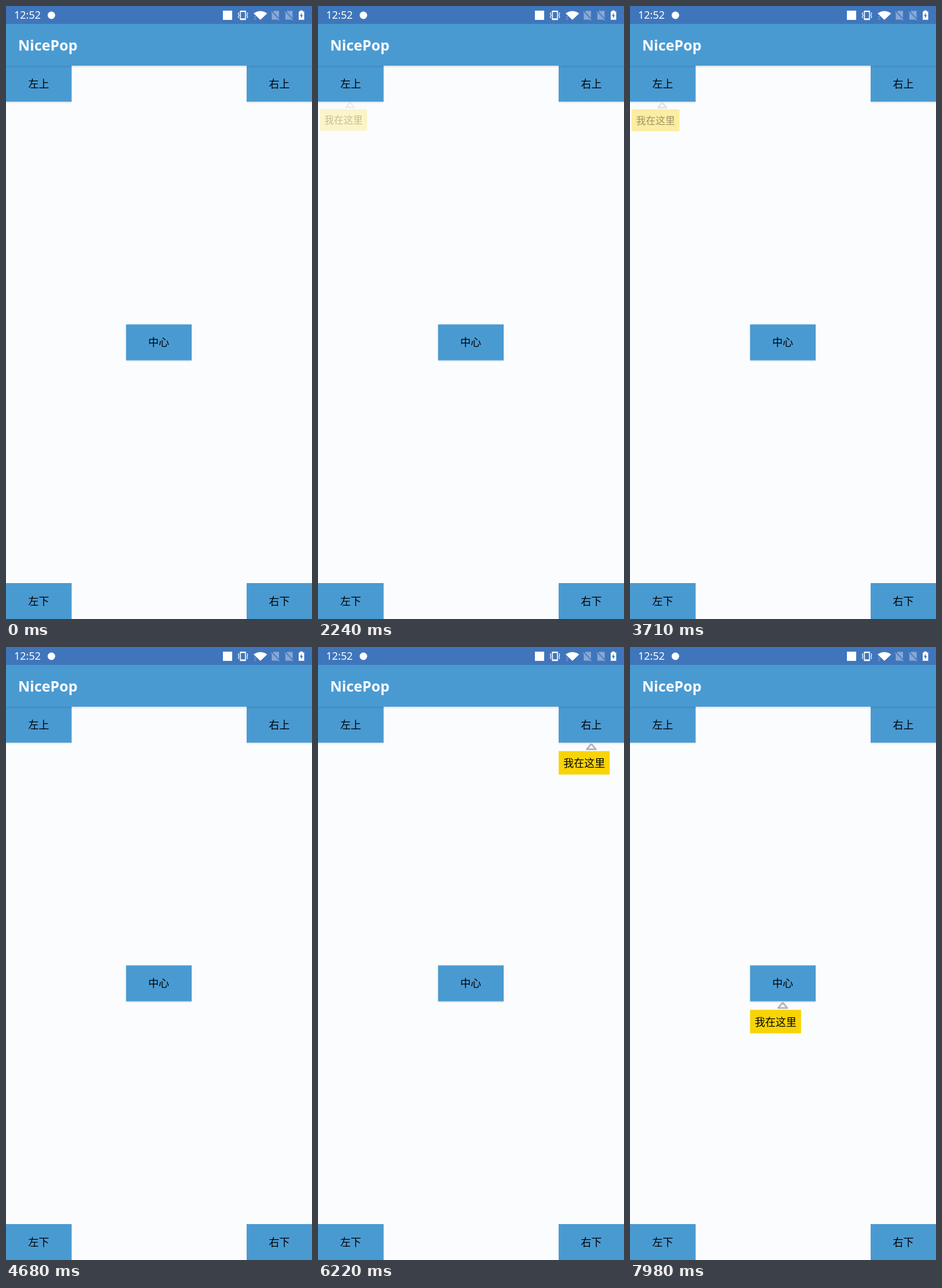
Recreate the animation shown at these times as an HTML page with a canvas. Size 529x1058 px, loop 8 s.

```html
<!DOCTYPE html>
<html lang="zh-CN">
<head>
<meta charset="utf-8">
<title>NicePop</title>
<style>
html, body { margin: 0; width: 100%; height: 100%; overflow: hidden; background: #fbfcfe; }
canvas { display: block; }
</style>
</head>
<body>
<canvas id="stage" width="529" height="1058"></canvas>
<script>
const ctx = document.getElementById('stage').getContext('2d');
const W = 529, H = 1058, LOOP = 8000, SHOW = 640, HIDE = 620;
const LATIN = '"Noto Sans", "Open Sans", sans-serif';
const CJK = '"Noto Sans CJK SC", "Noto Sans CJK", "Noto Sans", sans-serif';
const BLUE = '#4a9ad2', BAR = '#3f76bb', FADED = '#86a9d8';

const buttons = [
  ['左上', 0, 103], ['右上', 416, 103], ['中心', 207.5, 549.5],
  ['左下', 0, 996], ['右下', 416, 996]
];
const popups = [
  { x: 0, y: 165, show: 1940, hide: 3470 },
  { x: 416, y: 165, show: 4680, hide: 6220 },
  { x: 207.5, y: 611.5, show: 7330, hide: Infinity }
];

function rect(x, y, w, h, color) {
  ctx.fillStyle = color;
  ctx.fillRect(x, y, w, h);
}

function text(str, x, y, font, color, align = 'center') {
  ctx.font = font;
  ctx.fillStyle = color;
  ctx.textAlign = align;
  ctx.fillText(str, x, y);
}

function trace(points, close) {
  ctx.beginPath();
  points.forEach(([x, y]) => ctx.lineTo(x, y));
  if (close) ctx.closePath();
}

function line(points, color, width) {
  trace(points);
  ctx.strokeStyle = color;
  ctx.lineWidth = width;
  ctx.stroke();
}

function poly(points, color) {
  trace(points, true);
  ctx.fillStyle = color;
  ctx.fill();
}

function shade(y, h, x, w, alpha) {
  const g = ctx.createLinearGradient(0, y, 0, y + h);
  g.addColorStop(0, `rgba(0,20,50,${alpha})`);
  g.addColorStop(1, 'rgba(0,20,50,0)');
  rect(x, y, w, h, g);
}

function simCard(x) {
  poly([[x + 4, 8.5], [x + 13.5, 8.5], [x + 13.5, 23.5], [x + 1, 23.5], [x + 1, 12]], FADED);
  line([[x, 8.5], [x + 14, 23.5]], BAR, 2.6);
  line([[x, 10], [x + 14, 24.5]], FADED, 1.3);
}

function statusBar() {
  rect(0, 0, W, 31, BAR);
  text('12:52', 14, 22.3, '18px ' + LATIN, '#fff', 'left');
  ctx.beginPath();
  ctx.arc(78.5, 16, 6.5, 0, Math.PI * 2);
  ctx.fill();
  rect(375, 8, 16, 16, '#fff');

  // vibrating phone
  ctx.strokeStyle = '#fff';
  ctx.lineWidth = 1.6;
  ctx.strokeRect(405.3, 8.8, 8.6, 14.6);
  rect(405, 8, 9, 2.4, '#fff');
  rect(405, 21.4, 9, 2.4, '#fff');
  for (const [x, d] of [[403, -1], [416.3, 1]]) {
    line([[x, 11], [x + d * 1.6, 13.5], [x, 16], [x + d * 1.6, 18.5], [x, 21]], '#fff', 1.2);
  }

  // wifi
  ctx.beginPath();
  ctx.moveTo(428, 12.8);
  ctx.quadraticCurveTo(439.8, 4.6, 451.5, 12.8);
  ctx.lineTo(439.8, 24);
  ctx.closePath();
  ctx.fillStyle = '#fff';
  ctx.fill();
  rect(429, 18, 3, 1.3, FADED);
  rect(429, 22, 3, 1.3, FADED);

  simCard(458.5);
  simCard(482);

  // charging battery
  rect(508.3, 7.7, 4.6, 3, '#fff');
  rect(506, 9.5, 9.5, 14.3, '#fff');
  poly([[511.6, 11.5], [508, 17.3], [510.2, 17.3], [509.7, 21.5], [513.5, 15.7], [511.2, 15.7]], BAR);
}

function page() {
  rect(0, 0, W, H, '#fbfcfe');
  rect(0, 31, W, 72, BLUE);
  text('NicePop', 21, 77, '600 25px ' + LATIN, '#fff', 'left');
  for (const [label, x, y] of buttons) {
    shade(y + 62, 3, x, 113.5, 0.16);
    rect(x, y, 113.5, 62, BLUE);
    text(label, x + 56.5, y + 37.7, '18px ' + CJK, '#000');
  }
  shade(103, 4, 0, W, 0.12);
  statusBar();
}

// 0 hidden, 1 fully open
function openness(p, t) {
  if (t < p.show) return 0;
  const k = t < p.hide ? Math.min(1, (t - p.show) / SHOW)
                       : Math.max(0, 1 - (t - p.hide) / HIDE);
  return k * k;
}

function popup(p, k) {
  const scale = 0.9 + 0.1 * k;
  ctx.save();
  ctx.globalAlpha = k;
  ctx.translate(p.x + 44, p.y - 8);
  ctx.scale(scale, scale);
  ctx.translate(-44, 8);
  rect(0, 14.7, 88.3, 40.5, '#f8d406');
  text('我在这里', 44.2, 42, '300 18px ' + CJK, '#000');
  trace([[48.7, 11.5], [55.8, 3], [57.2, 3], [64.3, 11.5]], true);
  ctx.fillStyle = '#fff';
  ctx.fill();
  ctx.lineJoin = 'round';
  ctx.lineWidth = 3;
  ctx.strokeStyle = '#b4b8b6';
  ctx.stroke();
  ctx.restore();
}

function draw() {
  const t = performance.now() % LOOP;
  page();
  for (const p of popups) {
    const k = openness(p, t);
    if (k > 0) popup(p, k);
  }
  requestAnimationFrame(draw);
}
draw();
</script>
</body>
</html>
```
